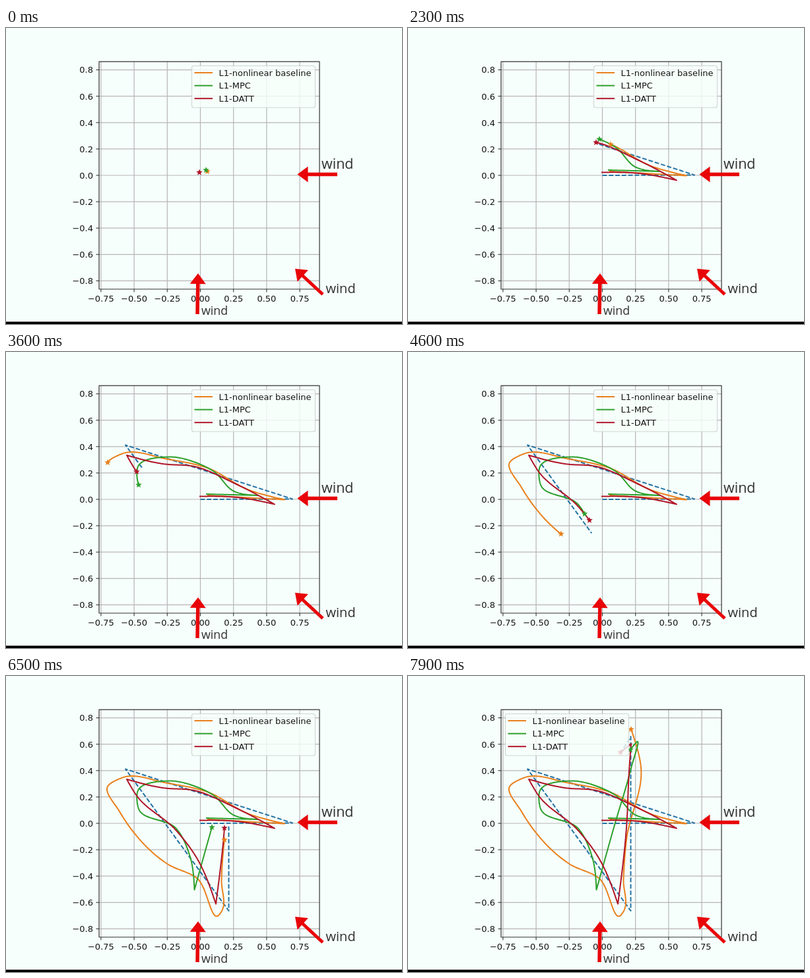
These frames come from a looping animation (600x450 px, 8000 ms). An HTML page with a canvas:

```html
<!DOCTYPE html>
<html>
<head>
<meta charset="utf-8">
<style>
html, body { margin: 0; width: 100%; height: 100%; overflow: hidden; background: #f6fffc; }
canvas { display: block; }
</style>
</head>
<body>
<canvas id="stage" width="600" height="450"></canvas>
<script>
const ctx = document.getElementById('stage').getContext('2d');
const LOOP = 8000, STEP = 100, LEGEND_MOVE = 7400;
const ORANGE = '#ea801c', GREEN = '#2ca02c', RED = '#b01428', BLUE = '#2272a4';

// Key points: [x, y, time (optional), sharp corner (optional)]
const reference = buildTrack([
  [294.5, 224, 0, 1], [434, 223.5, 980, 1], [181, 141.5, 3240, 1],
  [337.5, 357, 5430, 1], [337.5, 92, 7640, 1], [322, 117, 7900, 1]
]);
const tracks = [
  { color: ORANGE, label: 'L1-nonlinear baseline', path: buildTrack([
    [305, 218, 0], [422, 224.5, 1300, 1], [365, 208.5], [307, 177, 2300],
    [245, 163], [175, 155], [154, 168, 3600], [172, 206], [245, 286],
    [290, 308], [323, 363, 5600], [326.5, 358], [326.5, 310], [331, 249, 6500],
    [353, 139], [338, 81, 7900]]) },
  { color: GREEN, label: 'L1-MPC', path: buildTrack([
    [303, 216, 0], [382, 218, 1180, 1], [345, 211.5], [314, 181], [290, 169, 2300],
    [247, 159.5], [200, 174], [201, 202, 3600], [258, 232], [279, 275],
    [285.5, 325, 5580, 1], [312, 230, 6500], [338, 140], [347, 100], [337, 112, 7900]]) },
  { color: RED, label: 'L1-DATT', path: buildTrack([
    [293, 219.5, 0], [350, 221], [407, 231.5, 1150, 1], [345, 199], [285, 174, 2300],
    [237, 170], [183, 157, 3330, 1], [198, 182, 3600], [258, 235], [288, 275],
    [318, 346.5, 5540, 1], [331, 231, 6500], [335, 145], [338, 103, 7600, 1],
    [322, 116, 7900]]) }
];

// Joins key points with smooth curves, then spreads time by length between timed points.
function buildTrack(pts) {
  const last = pts.length - 1;
  const chord = i => Math.hypot(pts[i + 1][0] - pts[i][0], pts[i + 1][1] - pts[i][1]);
  const secant = (i, axis) => (pts[i + 1][axis] - pts[i][axis]) / chord(i);
  const sharp = i => i === 0 || i === last || pts[i][3];
  const smooth = (i, axis) => {
    const w = chord(i) / (chord(i - 1) + chord(i));
    return w * secant(i - 1, axis) + (1 - w) * secant(i, axis);
  };
  const slope = (i, other, axis) => {
    if (!sharp(i)) return smooth(i, axis);
    const s = secant(Math.min(i, other), axis);
    return sharp(other) ? s : 1.5 * s - smooth(other, axis) / 2;
  };
  const curve = (i, u, axis) => {
    const a = pts[i][axis], d = pts[i + 1][axis] - a;
    const m = slope(i, i + 1, axis) * chord(i), n = slope(i + 1, i, axis) * chord(i);
    return a + u * (m + u * (3 * d - 2 * m - n + u * (m + n - 2 * d)));
  };

  const out = [{ x: pts[0][0], y: pts[0][1], t: 0, length: 0 }];
  let timed = 0;
  for (let i = 0; i < last; i++) {
    for (let k = 1; k <= 20; k++) {
      const x = curve(i, k / 20, 0), y = curve(i, k / 20, 1), p = out[out.length - 1];
      out.push({ x, y, length: p.length + Math.hypot(x - p.x, y - p.y) });
    }
    const time = pts[i + 1][2];
    if (time === undefined) continue;
    const from = out[timed], to = out[out.length - 1];
    for (const p of out.slice(timed + 1))
      p.t = from.t + (time - from.t) * (p.length - from.length) / (to.length - from.length);
    timed = out.length - 1;
  }
  return out;
}

function drawTrack(path, t, color, dash) {
  ctx.strokeStyle = color;
  ctx.lineWidth = 2;
  ctx.lineJoin = 'round';
  ctx.setLineDash(dash);
  ctx.beginPath();
  ctx.moveTo(path[0].x, path[0].y);
  let end = path[0];
  for (let i = 1; i < path.length && end.t < t; i++) {
    const p = path[i - 1], q = path[i];
    const u = Math.min(1, (t - p.t) / (q.t - p.t));
    end = { x: p.x + (q.x - p.x) * u, y: p.y + (q.y - p.y) * u, t: q.t };
    ctx.lineTo(end.x, end.y);
  }
  ctx.stroke();
  ctx.setLineDash([]);
  return end;
}

function star({ x, y }, color) {
  ctx.fillStyle = color;
  ctx.beginPath();
  for (let i = 0; i < 10; i++) {
    const r = i % 2 ? 2.2 : 5, a = i * Math.PI / 5;
    ctx.lineTo(x + r * Math.sin(a), y - r * Math.cos(a));
  }
  ctx.fill();
}

function line(x1, y1, x2, y2, color, width) {
  ctx.strokeStyle = color;
  ctx.lineWidth = width;
  ctx.beginPath();
  ctx.moveTo(x1, y1);
  ctx.lineTo(x2, y2);
  ctx.stroke();
}

function text(str, x, y, align = 'left', font = '13px "DejaVu Sans", sans-serif', color = '#141414') {
  ctx.font = font;
  ctx.textAlign = align;
  ctx.fillStyle = color;
  ctx.fillText(str, x, y);
}

function tickLabel(v, digits) {
  return (v < 0 ? '\u2212' : '') + Math.abs(v).toFixed(digits);
}

function axes() {
  for (let i = -3; i <= 3; i++) {
    const x = 294.5 + i * 50.2;
    line(x, 51, x, 397, '#b8b4b6', 1.2);
    line(x, 397, x, 401.5, '#333', 1.1);
    text(tickLabel(i / 4, 2), x, 416, 'center');
  }
  for (let i = -4; i <= 4; i++) {
    const y = 224 - i * 40.1;
    line(141, y, 475, y, '#b8b4b6', 1.2);
    line(136.5, y, 141, y, '#333', 1.1);
    text(tickLabel(i / 5, 1), 132, y + 4.8, 'right');
  }
}

function legend(x) {
  ctx.beginPath();
  ctx.roundRect(x, 57.5, 187, 63.5, 3);
  ctx.fillStyle = 'rgba(248,255,252,.8)';
  ctx.fill();
  ctx.strokeStyle = '#d0d4d2';
  ctx.lineWidth = 1.1;
  ctx.stroke();
  tracks.forEach(({ color, label }, i) => {
    const y = 68 + i * 19.6;
    line(x + 4, y, x + 31.5, y, color, 2);
    text(label, x + 41, y + 4.8);
  });
}

function arrow(x, y, tailX, tailY, width) {
  const length = Math.hypot(tailX - x, tailY - y);
  ctx.save();
  ctx.translate(x, y);
  ctx.rotate(Math.atan2(tailY - y, tailX - x));
  ctx.fillStyle = '#e80408';
  ctx.fillRect(14, -width / 2, length - 14, width);
  ctx.beginPath();
  ctx.moveTo(0, 0);
  ctx.lineTo(16, -12);
  ctx.lineTo(16, 12);
  ctx.fill();
  ctx.restore();
}

function wind(x, y, size) {
  text('wind', x, y, 'left', size + 'px "Open Sans", sans-serif', '#303030');
}

function draw(t) {
  ctx.fillStyle = '#f6fffc';
  ctx.fillRect(0, 0, 600, 450);
  ctx.fillStyle = '#000';
  ctx.fillRect(0, 446.5, 600, 3.5);
  axes();
  drawTrack(reference, t, BLUE, [6.8, 3]);
  const ends = tracks.map(({ path, color }) => drawTrack(path, t, color, []));
  ends.forEach((end, i) => star(end, tracks[i].color));
  ctx.strokeStyle = '#333';
  ctx.lineWidth = 1.2;
  ctx.strokeRect(141, 51.2, 334, 345.8);
  legend(t < LEGEND_MOVE ? 281.5 : 147.5);
  arrow(441.5, 222.5, 502, 222.5, 5.5);
  arrow(291, 373, 290, 435, 5.5);
  arrow(438, 366, 480, 405, 5);
  wind(478, 214, 21.5);
  wind(484.5, 402.5, 20);
  wind(296, 436, 17.8);
}

const begin = performance.now();
function frame() {
  const t = (performance.now() - begin) % LOOP;
  draw(Math.floor(t / STEP) * STEP);
  requestAnimationFrame(frame);
}
frame();
</script>
</body>
</html>
```
